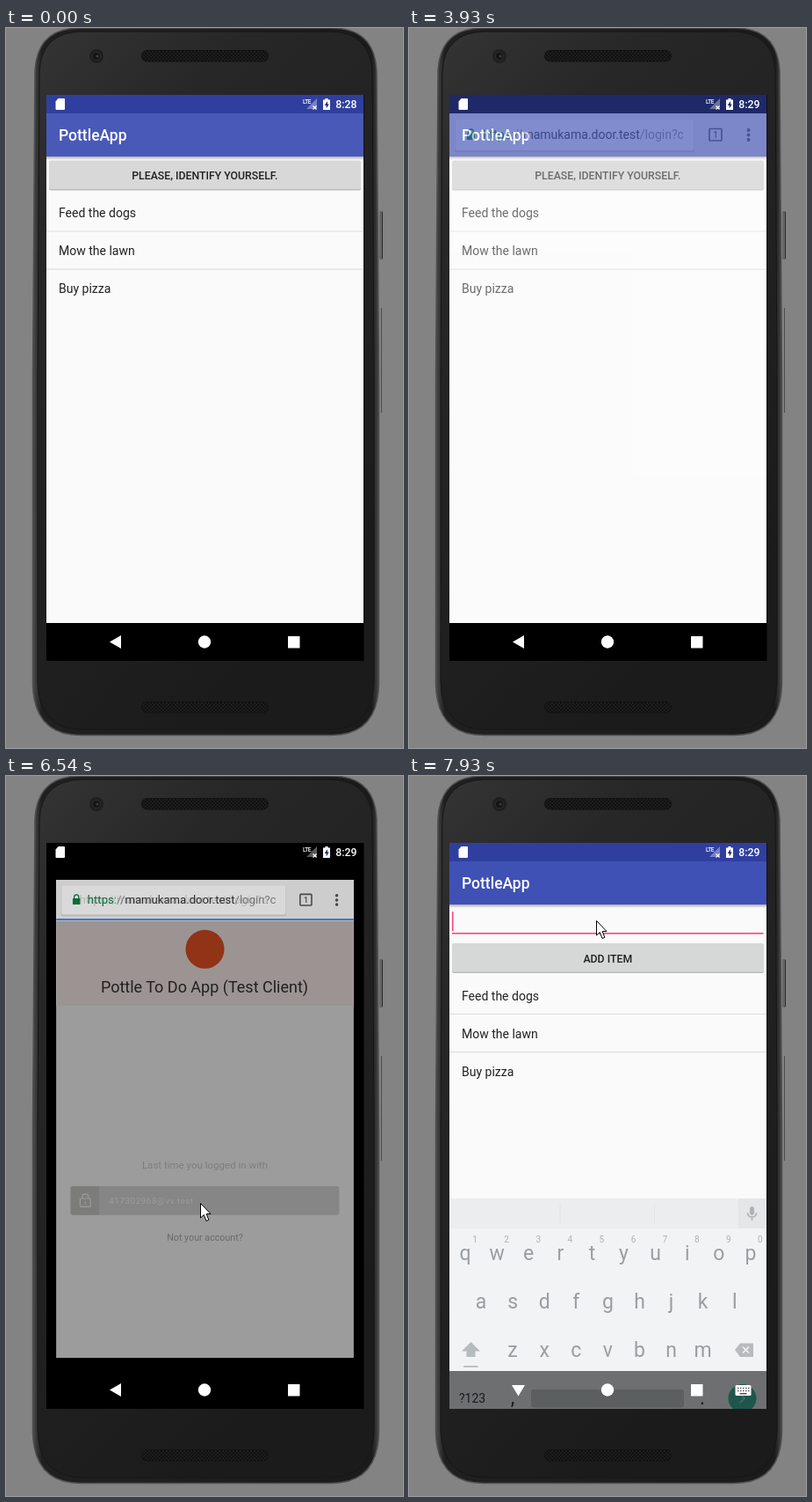
Animation of 452 by 818 pixels, one loop 8 s. Source, as an HTML page:

```html
<!DOCTYPE html>
<html lang="en">
<head>
<meta charset="utf-8">
<title>To-do app login</title>
<style>
  html, body { margin: 0; width: 100%; height: 100%; overflow: hidden; background: #838383; }
  svg { display: block; width: 452px; height: 818px; font-family: Roboto, sans-serif; }
  .mid { text-anchor: middle; }
  .bold { font-weight: 500; }
</style>
</head>
<body>
<svg viewBox="0 0 452 818">
  <defs>
    <linearGradient id="body" x1="0" y1="0" x2=".5" y2="1">
      <stop offset="0" stop-color="#343435"/><stop offset=".25" stop-color="#272728"/><stop offset="1" stop-color="#1b1b1c"/>
    </linearGradient>
    <linearGradient id="rim" x1="0" x2="1">
      <stop offset="0" stop-color="#4b4b4c"/><stop offset=".025" stop-color="#202021"/>
      <stop offset=".98" stop-color="#1b1b1c"/><stop offset="1" stop-color="#464647"/>
    </linearGradient>
    <linearGradient id="drop" x1="0" y1="0" x2="0" y2="1">
      <stop offset="0" stop-color="#000" stop-opacity=".3"/><stop offset="1" stop-color="#000" stop-opacity="0"/>
    </linearGradient>
    <pattern id="mesh" width="4" height="4" patternUnits="userSpaceOnUse">
      <rect width="4" height="4" fill="#111112"/>
      <circle cx="1" cy="1" r=".8" fill="#2c2c2d"/><circle cx="3" cy="3" r=".8" fill="#2c2c2d"/>
    </pattern>
    <clipPath id="screen"><rect x="46" y="76" width="361.5" height="643"/></clipPath>
    <clipPath id="address"><rect x="56" y="104" width="260" height="35"/></clipPath>
  </defs>

  <rect width="452" height="818" fill="#838383"/>
  <rect x="425" y="208" width="4" height="55" rx="1" fill="#666"/>
  <path d="M428.500 209V262" stroke="#2b2b2b"/>
  <path d="M427.500 318V437" stroke="#4c4c4c"/>
  <path d="M33 48Q36 0 84 0H371Q419 0 422 48L424.500 400V746Q423 803.500 370 803.500H85Q32 803.500 30.500 746V400Z"
        fill="url(#rim)" stroke="#505051" stroke-width="1.500"/>
  <path d="M38 50Q40 5 86 4H369Q415 5 417 50L419 400V744Q417 797 368 797H87Q38 797 36 744V400Z"
        fill="url(#body)" stroke="#161617"/>
  <circle cx="103" cy="32" r="8" fill="#1f1f20"/>
  <circle cx="103" cy="32" r="4.500" fill="#131314" stroke="#303032"/>
  <circle cx="104" cy="32" r="1.600" fill="#3c3d40"/>
  <rect x="154.500" y="25.500" width="144" height="12.500" rx="6" fill="url(#mesh)" stroke="#121213"/>
  <rect x="154.500" y="765.500" width="144" height="12.500" rx="6" fill="url(#mesh)" stroke="#121213"/>

  <g clip-path="url(#screen)">
    <rect x="45" y="75" width="364" height="646"/>

    <g id="browser">
      <rect x="46" y="97" width="361" height="579" fill="#fefefe"/>
      <g id="header">
        <rect x="46" y="147" width="361" height="102.500" fill="#fef2ee"/>
        <circle cx="226.500" cy="181" r="23.500" fill="#eb5424"/>
        <text class="mid" x="226" y="233" font-size="19.200" fill="#333">Pottle To Do App (Test Client)</text>
      </g>
      <g id="form">
        <text class="mid" x="226.500" y="446.500" font-size="12.300" fill="#868686">Last time you logged in with</text>
        <rect id="account" x="63.500" y="468" width="326" height="35" rx="3"/>
        <path d="M98 468H66.500Q63.500 468 63.500 471V500Q63.500 503 66.500 503H98Z" fill="#80837f"/>
        <g fill="none" stroke="#fff" stroke-width="1.200">
          <rect x="75" y="483" width="12.500" height="10" rx="1"/>
          <path d="M77.500 483V481Q77.500 477.500 81.200 477.500T85 481V483M81.200 486.500V490"/>
        </g>
        <text x="110" y="489" font-size="10.500" letter-spacing=".6" fill="#fff">417302968@vv.test</text>
        <text class="mid" x="226.500" y="534.500" font-size="11.400" fill="#333">Not your account?</text>
      </g>
      <rect id="pageShade" x="46" y="147" width="361" height="529"/>
      <rect x="46" y="97" width="361" height="49" fill="#f1f1f1"/>
      <rect x="46" y="146" width="361" height="1" fill="#d2d2d2"/>
      <rect x="52" y="105" width="273" height="36" rx="2" fill="#d6d6d6"/>
      <rect x="52.500" y="104" width="272" height="35" rx="2" fill="#fff"/>
      <path d="M66 119.500H75V127H66Z" fill="#0b8043"/>
      <path d="M67.800 120V117.500Q67.800 115 70.500 115T73.200 117.500V120" fill="none" stroke="#0b8043" stroke-width="1.400"/>
      <g clip-path="url(#address)" font-size="14">
        <text id="ghost" x="74" y="126" fill="#888">https://mamukama.door.test/login?c</text>
        <text x="84" y="126" fill="#8c8c8c"><tspan fill="#0b8043">https</tspan>://<tspan fill="#333">mamukama.door.test</tspan>/login?c</text>
      </g>
      <rect x="342" y="114.500" width="14" height="13.500" rx="1" fill="none" stroke="#555" stroke-width="1.700"/>
      <text class="mid bold" x="349" y="125" font-size="10" fill="#555">1</text>
      <g fill="#555"><circle cx="386.500" cy="116" r="1.900"/><circle cx="386.500" cy="121.500" r="1.900"/><circle cx="386.500" cy="127" r="1.900"/></g>
      <rect id="progress" x="46" y="144" height="2" fill="#4285f4"/>
      <rect id="shade" x="46" y="97" width="361" height="579"/>
    </g>

    <g id="app">
      <rect x="46" y="76" width="361" height="600" fill="#fafafa"/>
      <rect x="46" y="76" width="361" height="21" fill="#303f9f"/>
      <rect id="bar" x="46" y="97" width="361" height="49"/>
      <rect x="46" y="146" width="361" height="4" fill="url(#drop)"/>
      <text class="bold" x="60" y="128" font-size="17.500" fill="#fff">PottleApp</text>
      <g id="field">
        <rect id="line" x="49" y="178" width="354.500"/>
        <rect id="caret" x="49" y="154" width="1.500" height="22" fill="#ff4081"/>
      </g>
      <g id="list">
        <rect x="49" y="152" width="355" height="32.500" rx="2" fill="#000" opacity=".25"/>
        <rect id="button" x="49" y="150.500" width="355" height="32.500" rx="2"/>
        <text id="label" class="mid bold" x="226.300" y="172" font-size="12.300" fill="#212121"></text>
        <g font-size="14" fill="#222">
          <text x="60" y="215">Feed the dogs</text><text x="60" y="258">Mow the lawn</text><text x="60" y="301">Buy pizza</text>
        </g>
        <path d="M46 231H407M46 274.200H407" stroke="#dedede" stroke-width="1.200"/>
      </g>
    </g>

    <g id="keyboard"></g>

    <g fill="#fff">
      <path d="M59.500 80H66Q67 80 67 81V92Q67 93 66 93H57.500Q56.500 93 56.500 92V83.500Z"/>
      <text class="bold" x="338" y="86" font-size="6.500" letter-spacing="-.5">LTE</text>
      <path d="M354 80V92H342Z" opacity=".35"/>
      <path d="M349.500 88.500L353.500 92.500M353.500 88.500L349.500 92.500" stroke="#fff" stroke-width="1.100"/>
      <path d="M363.500 80H366.500V81.500H369V93H361V81.500H363.500Z"/>
      <path d="M366 83L362.700 88H364.700V91.500L367.800 86.500H366Z" fill="#222c70"/>
      <text id="clock" class="bold" x="375.200" y="91.300" font-size="12.300"></text>
      <path id="back"/>
      <circle cx="226" cy="697.500" r="7.200"/>
      <rect x="321" y="691" width="13.500" height="13.500" rx=".5"/>
      <g id="imeIcon">
        <rect x="371.500" y="692" width="18" height="12" rx="1.500"/>
        <path d="M374 695.500H387.500M374 698.500H387.500" stroke="#555" stroke-width="1.500" stroke-dasharray="1.500 1.500"/>
        <path d="M376.500 701.700H384.500" stroke="#555" stroke-width="1.400"/>
      </g>
    </g>
  </g>

  <path id="cursor" d="M.5.5V17L4.300 13.500 7 20.500 9.800 19.300 7.200 12.500H12Z" fill="#fff" stroke="#000"/>
</svg>
<script>
const $ = id => document.getElementById(id);
const set = (id, attrs) => { for (const k in attrs) $(id).setAttribute(k, attrs[k]); };
const show = (id, on) => set(id, { display: on ? 'inline' : 'none' });

const LOOP = 8000, FPS = 13;

function buildKeyboard() {
  const pitch = 36.1;
  const row = (chars, x, y, size) => [...chars].map((c, i) =>
    `<text class="mid" x="${x + i * pitch}" y="${y}" font-size="${size}">${c}</text>`).join('');
  $('keyboard').innerHTML = `
    <rect x="46" y="480" width="361" height="300" fill="#e8ecef"/>
    <rect x="46" y="480" width="361" height="34" fill="#dce0e3"/>
    <rect x="375" y="480" width="32" height="34" fill="#cdd1d4"/>
    <path d="M172 487V508M279.500 487V508" stroke="#c8ccd0"/>
    <g fill="#5a6268" stroke="#5a6268">
      <rect x="388.500" y="489.500" width="4" height="9" rx="2"/>
      <path d="M385.500 496Q385.500 501 390.500 501T395.500 496M390.500 501V505" fill="none" stroke-width="1.500"/>
    </g>
    <g fill="#30393f">
      ${row('qwertyuiop', 64, 550, 23)}${row('asdfghjkl', 82, 605, 23)}${row('zxcvbnm', 118, 660, 23)}
      <text x="57" y="712" font-size="14">?123</text>
      <text class="mid" x="118" y="714" font-size="23">,</text><text class="mid" x="334" y="714" font-size="23">.</text>
    </g>
    <g fill="#59636a">${row('1234567890', 75, 530, 10)}</g>
    <path d="M70.500 643L81 653.500H75.500V660H65.500V653.500H60ZM62 670H78.500V671.800H62Z" fill="#6c757b"/>
    <path d="M371 652L377 644.500H392V660H377Z" fill="#6c757b"/>
    <path d="M380 648.500L387 655.500M387 648.500L380 655.500" stroke="#e8ecef" stroke-width="1.700"/>
    <rect x="139" y="697" width="174" height="20.500" rx="3" fill="#c4c9cd"/>
    <circle cx="379.500" cy="707" r="16" fill="#40b8a4"/>
    <path d="M377 702L382 707 377 712" fill="none" stroke="#8fd8cc" stroke-width="1.800"/>`;
}

// Rows are [time, ...values]; values hold before the first and after the last row.
function track(t, rows, ease = p => p) {
  const next = rows.findIndex(r => r[0] > t);
  if (next === 0) return rows[0].slice(1);
  if (next < 0) return rows.at(-1).slice(1);
  const a = rows[next - 1], b = rows[next], p = ease((t - a[0]) / (b[0] - a[0]));
  return a.slice(1).map((v, i) => v + (b[i + 1] - v) * p);
}
const smooth = p => p * p * (3 - 2 * p);

const pointer = [
  [150, 382, 744], [760, 211, 167], [1010, 211, 167], [1850, 361, 773], [1930, 366, 778],
  [2160, 366, 778], [2550, 374, 820], [4689, 374, 820], [4690, 353, 790], [5230, 221, 485],
  [6930, 221, 485], [7150, 235, 155], [7230, 235, 156], [7320, 235, 156], [7550, 213, 164]
];
// Columns: scale, whole shade, page shade.
const shrink = [[6320, 1, 0, 0], [6397, .9955, .01, .01], [6550, .938, .15, .28], [6700, .91, .4, .5]];
const ime = [[7700, 0, 140], [7780, .12, 90], [7850, .28, 40], [7930, .47, 0]];

function drawBrowser(t) {
  show('browser', t >= 3930 && t < 6850);
  const [scale, shade, pageShade] = track(t, shrink);
  set('browser', { transform: `translate(226.5 435) scale(${scale}) translate(-226.5 -435)` });
  set('header', { opacity: track(t, [[4000, 0], [4160, 1]])[0] });
  set('form', { opacity: track(t, [[4080, 0], [4310, 1], [6000, 1], [6240, .4]])[0] });
  set('account', { fill: t < 6080 ? '#c4c2c4' : '#a8a6a9' });
  set('shade', { opacity: shade });
  set('pageShade', { opacity: pageShade });
  set('progress', { width: track(t, [[6000, 0], [6240, 361]])[0] });
  set('ghost', { opacity: t < 6540 ? 0 : .35 });
}

function drawApp(t) {
  const returning = t >= 6620, loggedIn = t >= 7080, focused = t >= 7700;
  const rise = returning ? 330 * .312 ** ((t - 6632) / 77) : 0;
  set('app', {
    opacity: returning ? 1 : track(t, [[3860, 1], [4080, 0]])[0],
    transform: `translate(0 ${rise < 1 ? 0 : rise})`
  });
  set('bar', { fill: t < 2230 ? '#4959b8' : '#3f51b5' });
  const tone = Math.round(track(t, [[2160, 215], [2550, 205]])[0]);
  set('button', { fill: returning ? '#d6d7d7' : `rgb(${tone},${tone + 1},${tone})` });
  $('label').textContent = loggedIn ? 'ADD ITEM' : 'PLEASE, IDENTIFY YOURSELF.';
  set('list', { transform: `translate(0 ${loggedIn ? 39.5 : 0})` });
  show('field', loggedIn);
  show('caret', focused);
  set('line', focused ? { height: 1.6, fill: '#ff4081' } : { height: 1, fill: '#8a8a8a' });
}

function drawSystem(t) {
  const [alpha, drop] = track(t, ime), typing = t >= 7780;
  set('keyboard', { opacity: alpha, transform: `translate(0 ${drop})` });
  show('keyboard', typing);
  show('imeIcon', typing);
  set('back', { d: typing ? 'M117 692H132L124.500 704.500Z' : 'M131 690V705L118 697.500Z' });
  $('clock').textContent = t < 3930 ? '8:28' : '8:29';
  const [x, y] = track(t, pointer, smooth);
  set('cursor', { transform: `translate(${Math.round(x)} ${Math.round(y)})` });
  show('cursor', t >= 150 && t < 2550 || t >= 4690);
}

function draw(now) {
  const t = Math.floor((now % LOOP + 5) * FPS / 1000) * 1000 / FPS + 12;
  drawBrowser(t);
  drawApp(t);
  drawSystem(t);
}

buildKeyboard();
const start = performance.now();
function tick() {
  draw(performance.now() - start);
  requestAnimationFrame(tick);
}
tick();
</script>
</body>
</html>
```
